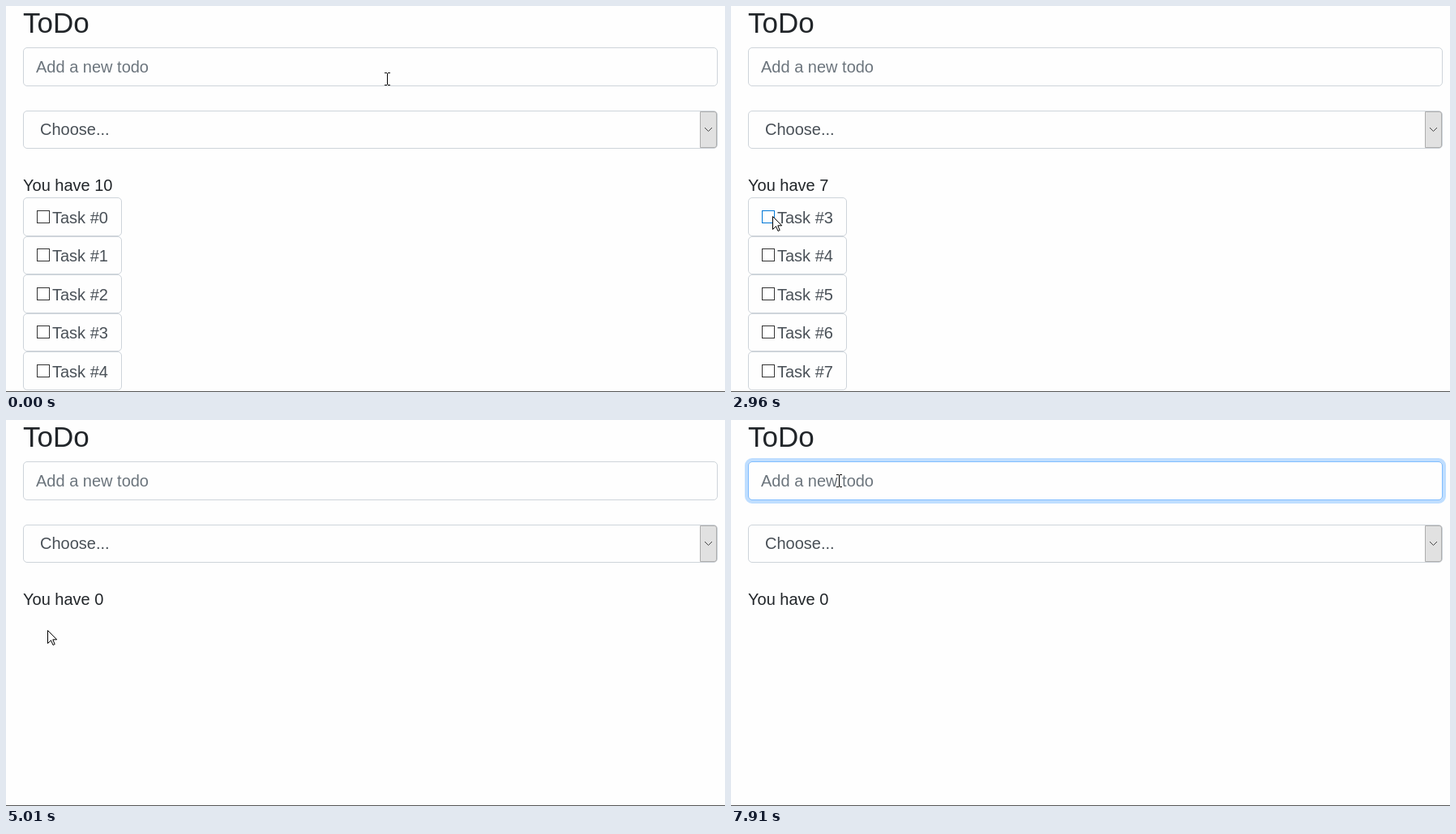
Recreate the animation shown at these times as an HTML page. Size 887 by 476 pixels, loop 8 s.

```html
<!DOCTYPE html>
<html lang="en">
<head>
<meta charset="utf-8">
<title>ToDo</title>
<style>
  html, body { margin: 0; width: 100%; height: 100%; overflow: hidden; background: #fefefe; }
  svg { display: block; width: 887px; height: 476px; font: 20px "Liberation Sans", Arial, sans-serif; fill: #495057; }
  .ink { fill: #212529; }
  .hint { fill: #6c757d; }
  .field { fill: #fefefe; stroke: #ced4da; }
  .check { fill: #fff; stroke: #333; }
  .hover .check { stroke: #0078d7; }
  .press .check { fill: #cce4f7; stroke: #005499; }
  .line { fill: none; stroke: #000; }

  #arrow, #beam, #focus, #caret { animation: 8s step-end infinite; }
  #arrow { animation-name: arrow; }
  #beam { animation-name: beam; }
  #focus { animation-name: focus; }
  #caret { animation-name: caret; }

  @keyframes arrow {
    0% { opacity: 0; transform: translate(340px, 163px); }
    1.5% { opacity: 1; transform: translate(340px, 163px); }
    3.375% { opacity: 1; transform: translate(201px, 232px); }
    6.875% { opacity: 1; transform: translate(176px, 236px); }
    8.625% { opacity: 1; transform: translate(124px, 246px); }
    10.5% { opacity: 1; transform: translate(82px, 254px); }
    12.25% { opacity: 1; transform: translate(60px, 258px); }
    14.125% { opacity: 1; transform: translate(51px, 259px); }
    71.125% { opacity: 1; transform: translate(59px, 238px); }
    72.75% { opacity: 1; transform: translate(92px, 165px); }
    74.5%, 100% { opacity: 0; transform: translate(125px, 100px); }
  }
  @keyframes beam {
    0% { opacity: 1; transform: translate(470px, 90px); }
    1.5% { opacity: 0; transform: translate(470px, 90px); }
    74.5% { opacity: 1; transform: translate(130px, 85px); }
    76.125%, 100% { opacity: 1; transform: translate(133px, 75px); }
  }
  @keyframes focus {
    0% { opacity: 0; }
    79.5% { opacity: .5; }
    81.5%, 100% { opacity: 1; }
  }
  @keyframes caret {
    0% { opacity: 0; }
    79.5% { opacity: 1; }
    84.875% { opacity: 0; }
    91.875% { opacity: 1; }
    98.875%, 100% { opacity: 0; }
  }
</style>
</head>
<body>
<svg viewBox="0 0 887 476">
  <text class="ink" x="21" y="33" font-size="35">ToDo</text>

  <rect class="field" x="21.5" y="51.5" width="856" height="47" rx="4.5"/>
  <g id="focus" fill="none">
    <rect x="19" y="49" width="861" height="52" rx="7" stroke="#bfdeff" stroke-width="4"/>
    <rect x="21.5" y="51.5" width="856" height="47" rx="4.5" stroke="#80bdff"/>
  </g>
  <text class="hint" x="37" y="82">Add a new todo</text>
  <rect id="caret" x="37" y="64" width="1" height="22" fill="#000"/>

  <rect class="field" x="21.5" y="129.5" width="856" height="46" rx="4.5"/>
  <text x="42" y="159">Choose...</text>
  <path d="M856.5 130.5H874Q876.5 130.5 876.5 133V172Q876.5 174.5 874 174.5H856.5Z" fill="#e1e1e1" stroke="#adadad"/>
  <path class="line" d="M862 150l4.5 4.5 4.5-4.5" style="stroke:#444"/>

  <text class="ink" id="total" x="21" y="228"></text>
  <g id="list"></g>
  <rect y="475" width="887" height="1" fill="#555"/>

  <path id="arrow" d="M.5.5V16.5L4.5 12.7 7 18.5 9.2 17.5 6.8 11.8H11.7Z" fill="#fff" stroke="#000"/>
  <path id="beam" class="line" d="M-3-7.5H0M1-7.5H4M.5-7V7M-3 7.5H0M1 7.5H4"/>
</svg>
<script>
  const LOOP = 8000, TASKS = 10, VISIBLE = 5;

  // time, tasks done, look of the first checkbox
  const steps = [
    [0, 0, ''], [1130, 0, 'hover'], [1560, 0, 'press'], [1690, 1, 'hover'],
    [2140, 1, 'press'], [2290, 2, 'press'], [2440, 2, 'hover'],
    [2810, 2, 'press'], [2960, 3, 'hover'], [3490, 3, 'press'], [3610, 4, 'hover'],
    [3890, 4, 'press'], [4020, 5, 'press'], [4160, 6, 'hover'], [4290, 6, 'press'],
    [4430, 7, 'hover'], [4560, 7, 'press'], [4700, 8, 'press'], [5010, 10, '']
  ];

  const list = document.getElementById('list');
  const total = document.getElementById('total');
  const rowTop = i => Math.round(236.4 + i * 47.45);

  for (let i = 0; i < VISIBLE; i++) {
    const y = rowTop(i), h = rowTop(i + 1) - y;
    const base = Math.floor(268 + i * 47.5);
    list.innerHTML += `<g>
      <rect class="field" x="21.5" y="${y + .5}" width="121" height="${h - 1}" rx="4.5"/>
      <rect class="check" x="38.5" y="${base - 15.5}" width="15" height="15"/>
      <text x="57" y="${base}"></text></g>`;
  }
  const rows = [...list.children];

  let start, shown;
  function draw(now) {
    start ??= now;
    const t = (now - start) % LOOP;
    const step = steps.findLast(s => s[0] <= t);
    if (step !== shown) {
      const [, done, look] = shown = step;
      total.textContent = `You have ${TASKS - done}`;
      rows.forEach((row, i) => {
        row.style.display = done + i < TASKS ? '' : 'none';
        row.lastElementChild.textContent = `Task #${done + i}`;
      });
      rows[0].setAttribute('class', look);
    }
    requestAnimationFrame(draw);
  }
  requestAnimationFrame(draw);
</script>
</body>
</html>
```
